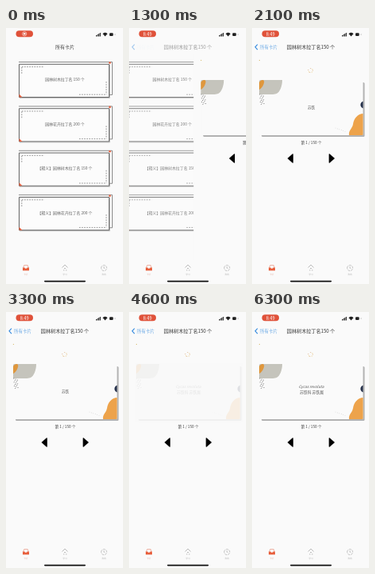
Recreate the animation shown at these times as an HTML page with a canvas. Size 147x320 px, loop 6.4 s.

```html
<!DOCTYPE html>
<html lang="zh-CN">
<head>
<meta charset="utf-8">
<title>卡片</title>
<style>
html, body { margin: 0; width: 100%; height: 100%; overflow: hidden; background: #fafafa; }
canvas { display: block; width: 147px; height: 320px; }
</style>
</head>
<body>
<canvas id="stage"></canvas>
<script>
const W = 147, H = 320, LOOP = 6400;
const BG = '#fafafa', INK = '#555', RED = '#e8613f', ORANGE = '#eda34b';
const FONT = '"Noto Sans CJK SC", "Noto Sans CJK", "Noto Sans", sans-serif';
const DECKS = ['园林树木拉丁名 150 个', '园林花卉拉丁名 200 个',
  '【释义】园林树木拉丁名 150 个', '【释义】园林花卉拉丁名 200 个'];

const canvas = document.getElementById('stage');
const c = canvas.getContext('2d');
const scale = window.devicePixelRatio || 1;
canvas.width = Math.round(W * scale);
canvas.height = Math.round(H * scale);

const clamp = v => Math.max(0, Math.min(1, v));
const ramp = (t, from, to) => clamp((t - from) / (to - from));

function text(str, x, y, size, color, align = 'center', style = '') {
  c.font = `${style} ${size}px ${FONT}`;
  c.fillStyle = color;
  c.textAlign = align;
  c.textBaseline = 'middle';
  c.fillText(str, x, y);
}

function rect(x, y, w, h, color) {
  c.fillStyle = color;
  c.fillRect(x, y, w, h);
}

function pill(x, y, w, h, r, color) {
  c.fillStyle = color;
  c.beginPath();
  c.roundRect(x, y, w, h, r);
  c.fill();
}

function dot(x, y, r, color) {
  c.fillStyle = color;
  c.beginPath();
  c.arc(x, y, r, 0, 7);
  c.fill();
}

function shape(path, color) {
  c.fillStyle = color;
  c.fill(new Path2D(path));
}

function line(path, color, width = 1, dash = []) {
  c.strokeStyle = color;
  c.lineWidth = width;
  c.setLineDash(dash);
  c.stroke(new Path2D(path));
  c.setLineDash([]);
}

// Draws a group with its own offset and opacity
function group(x, y, alpha, draw) {
  if (alpha <= 0) return;
  c.save();
  c.translate(x, y);
  c.globalAlpha *= alpha;
  draw();
  c.restore();
}

// Critically damped spring for the page push, 1 -> 0
function pushLeft(t) {
  const s = Math.max(0, t - 1219) * 0.0185;
  return (1 + s) * Math.exp(-s);
}

function deck(label, i) {
  group(0, i * 55.4, 1, () => {
    line('M16 42.5H133.5V83.5H130', '#808080', .9);
    dot(130.5, 43.5, 1.3, RED);
    rect(16.5, 45, 113, 42, '#fcfcfc');
    line('M16.5 45.3H129.5V86.5H16.5Z', INK, .9);
    line('M17 87.4H130.3V46', '#999', .7);
    shape('M16.5 82.5v4h4z', RED);
    line('M20 48.6H48M19.8 49V58', '#777', .8, [1.6, 1.5]);
    line('M92 83.2H126M126 67V83', '#777', .8, [1.6, 1.5]);
    text(label, 74, 64.6, 4.9, '#666');
  });
}

function cardArt() {
  pill(12, 68, 129.5, 68, 1.5, '#b2b2b2');
  c.save();
  c.beginPath();
  c.roundRect(9, 65, 130.5, 69, 1.5);
  c.fillStyle = BG;
  c.fill();
  c.clip();
  shape('M9 65H38C38 73 35 80 31 82C28 83.5 16 83 9 83Z', '#c5c4bc');
  shape('M9 68C11 65 14 64 15 66C16 69 13 75 9 77Z', '#df973d');
  for (let i = 0; i < 14; i++) {
    dot(9.8 + i * 2.3 % 5.6, 83 + i * .95, .5, '#555');
  }
  shape('M122 134C121 128 126 126 127 120C128 113 133 107 140 107V134Z', ORANGE);
  dot(141, 96, 4.7, '#25304a');
  for (let i = 0; i < 6; i++) dot(105 + i * 2.4, 125 + i * .9, .35, '#aaa');
  c.restore();
}

function card(t) {
  cardArt();
  if (t < 4520) {
    text('苏铁', 74.5, 99, 4.5, '#555');
  } else {
    text('Cycas revoluta', 74.5, 93, 4.7, '#555', 'center', 'italic');
    text('苏铁科 苏铁属', 75, 100, 4.8, '#555');
  }
  // A veil fades the whole card out and its other side in
  const veil = ramp(t, 4130, 4480) * (1 - ramp(t, 4560, 4880));
  group(0, 0, veil, () => rect(8, 64, 135, 74, BG));
}

function detail(t) {
  rect(0, 32, W, 258, BG);
  dot(9.4, 40.4, .6, '#d9bd72');
  for (let i = 0; i < 7; i++) {
    dot(73.5 + 2.8 * Math.cos(i * 2.4), 53 + 2.5 * Math.sin(i * 2.4), .5, i % 2 ? '#e8c56b' : '#d8a878');
  }
  card(t);
  text('第 1 / 150 个', 74.5, 143.5, 4.7, '#444');
  shape('M44.5 163L51 157.3Q51.8 157 51.8 158V168Q51.8 169 51 168.7Z', '#000');
  shape('M104 163L97.4 157.3Q96.6 157 96.6 158V168Q96.6 169 97.4 168.7Z', '#000');
}

function statusBar(t) {
  pill(12.5, 3.3, 21.5, 8, 4, '#e0523a');
  // The recording mark gives way to the clock
  const clock = ramp(t, 300, 600);
  group(0, 0, 1 - clock, () => {
    dot(23.2, 7.3, 1.3, '#fff');
    line('M20.6 7.3A2.6 2.6 0 1 1 25.8 7.3A2.6 2.6 0 1 1 20.6 7.3', '#fff', .6);
  });
  group(0, 0, clock, () => text('8:49', 23.2, 7.4, 5.6, '#fff'));
  for (let i = 0; i < 4; i++) rect(113 + i * 1.6, 9 - i, 1.1, 1.5 + i, '#222');
  shape('M121.5 7.2Q124.5 4.4 127.5 7.2L124.5 10.5Z', '#222');
  pill(130, 6.3, 4.6, 3.8, 1, '#222');
  rect(136.7, 7.3, .6, 1.6, '#999');
}

function navBar(p) {
  group(0, 0, 1 - 2 * p, () => text('所有卡片', 74, 23.7, 6, '#444'));
  group(0, 0, p, () => {
    line('M7 20.5L4 23.8L7 27.1', '#2e86de', 1.1);
    text('园林树木拉丁名150 个', 74, 23.7, 6.1, '#333');
  });
  group(0, 0, p ** 4, () => text('所有卡片', 10, 23.7, 5.5, '#6ba9e5', 'left'));
}

function tabBar() {
  rect(0, 290, W, 30, BG);
  line('M21.6 300L22.8 296.6H27.2L28.4 300', '#e9907a', .7);
  shape('M21 299.6H23.4Q25 302 26.6 299.6H29V303.3H21Z', RED);
  line('M70.5 299.5L74 296L77.5 299.5M72 302.8H73.4M75 302.8H76.4M73 300.5H75', '#aaa', .8);
  line('M119.6 300A3.5 3.5 0 1 1 126.6 300A3.5 3.5 0 1 1 119.6 300M123 298V300.4H125', '#aaa', .7, [3, 1]);
  text('卡片', 25, 308, 2.8, '#e3b3a6');
  text('学习', 74, 308, 2.8, '#bbb');
  text('我的', 123, 308, 2.8, '#bbb');
  pill(48, 315.8, 52, 1.6, .8, '#111');
}

function draw(t) {
  c.setTransform(scale, 0, 0, scale, 0, 0);
  rect(0, 0, W, H, BG);
  const left = pushLeft(t), p = 1 - left;
  if (left > .002) group(-.3 * W * p, 0, 1 - .4 * p, () => DECKS.forEach(deck));
  if (p > 0) group(W * left, 0, 1, () => detail(t));
  statusBar(t);
  navBar(p);
  tabBar();
}

const start = performance.now();
function frame() {
  draw((performance.now() - start) % LOOP);
  requestAnimationFrame(frame);
}
frame();
</script>
</body>
</html>
```
